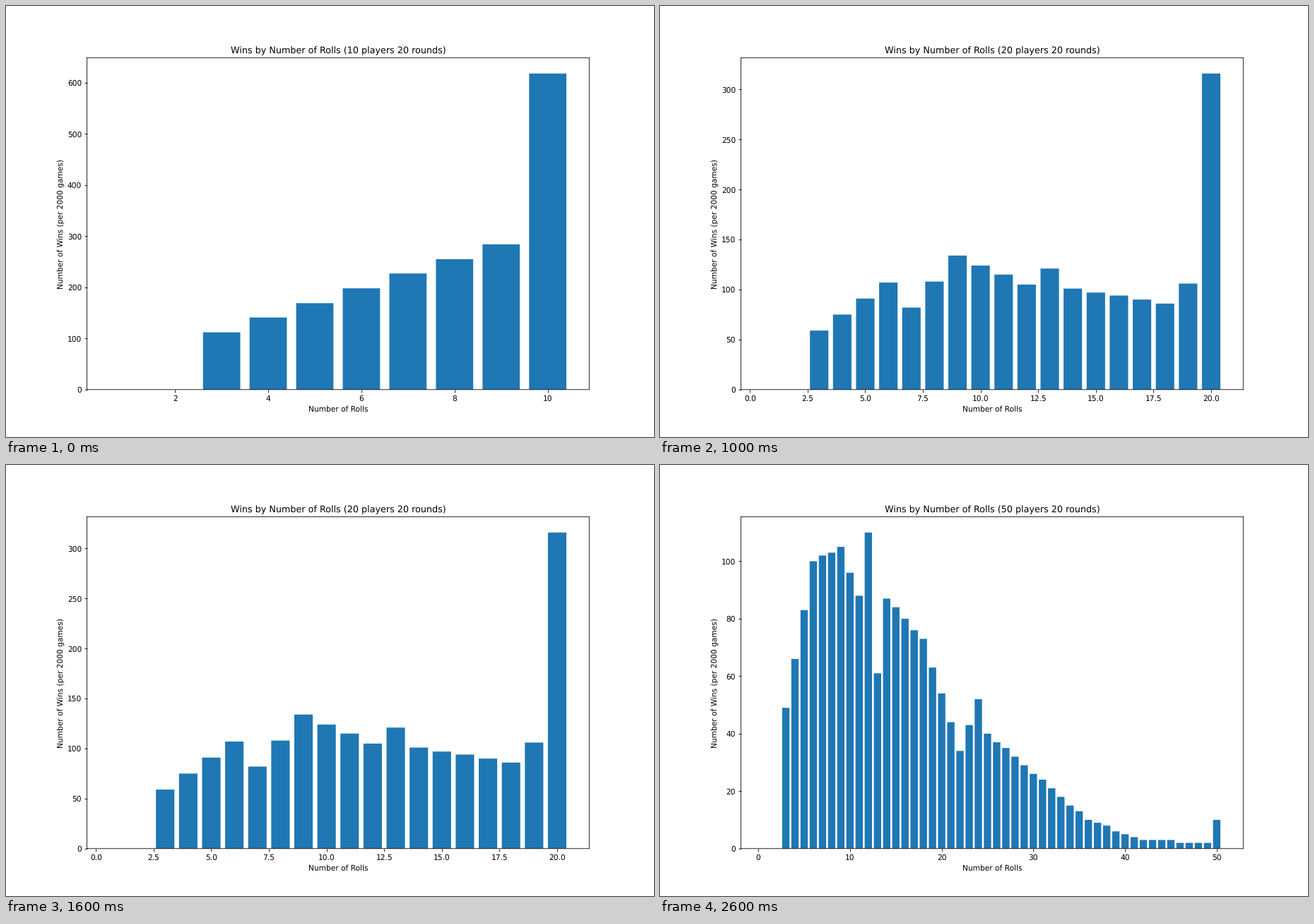
A matplotlib script that plays this animation: 917x611 px, repeating every 3000 ms.

```python
import matplotlib.pyplot as plt
import numpy as np
from matplotlib.animation import FuncAnimation

WIDTH, HEIGHT = 917, 611
DPI = WIDTH / 12  # a chart 12 inches wide
EPS = 1e-6        # keeps the pixel size from being truncated down

# Turning points (rolls, wins) of each curve; the bars between lie on a line.
CURVES = [
    [(3, 112), (9, 284), (10, 618)],
    [(3, 59), (6, 107), (7, 82), (9, 134), (12, 105), (13, 121),
     (14, 101), (18, 86), (19, 106), (20, 316)],
    [(3, 49), (6, 100), (9, 105), (11, 88), (12, 110), (13, 61), (14, 87),
     (18, 73), (22, 34), (24, 52), (25, 40), (36, 10), (42, 3), (49, 2),
     (50, 10)],
]

# Soft edges: shapes and glyphs keep their fractional positions.
plt.rcParams.update({
    "font.family": "DejaVu Sans",
    "text.hinting": "no_hinting",
    "path.snap": False,
})
fig, ax = plt.subplots(
    figsize=((WIDTH + EPS) / DPI, (HEIGHT + EPS) / DPI), dpi=DPI)


def draw(index):
    points, wins = zip(*CURVES[index])
    players = points[-1]
    rolls = np.arange(1, players + 1)
    ax.clear()
    ax.bar(rolls, np.rint(np.interp(rolls, points, wins, left=0)),
           color="#1f77b4")
    ax.set_title(f"Wins by Number of Rolls ({players} players 20 rounds)")
    ax.set_xlabel("Number of Rolls")
    ax.set_ylabel("Number of Wins (per 2000 games)")


anim = FuncAnimation(fig, draw, frames=len(CURVES), init_func=lambda: draw(0),
                     interval=1000, repeat=True, repeat_delay=0)
plt.show()
```
